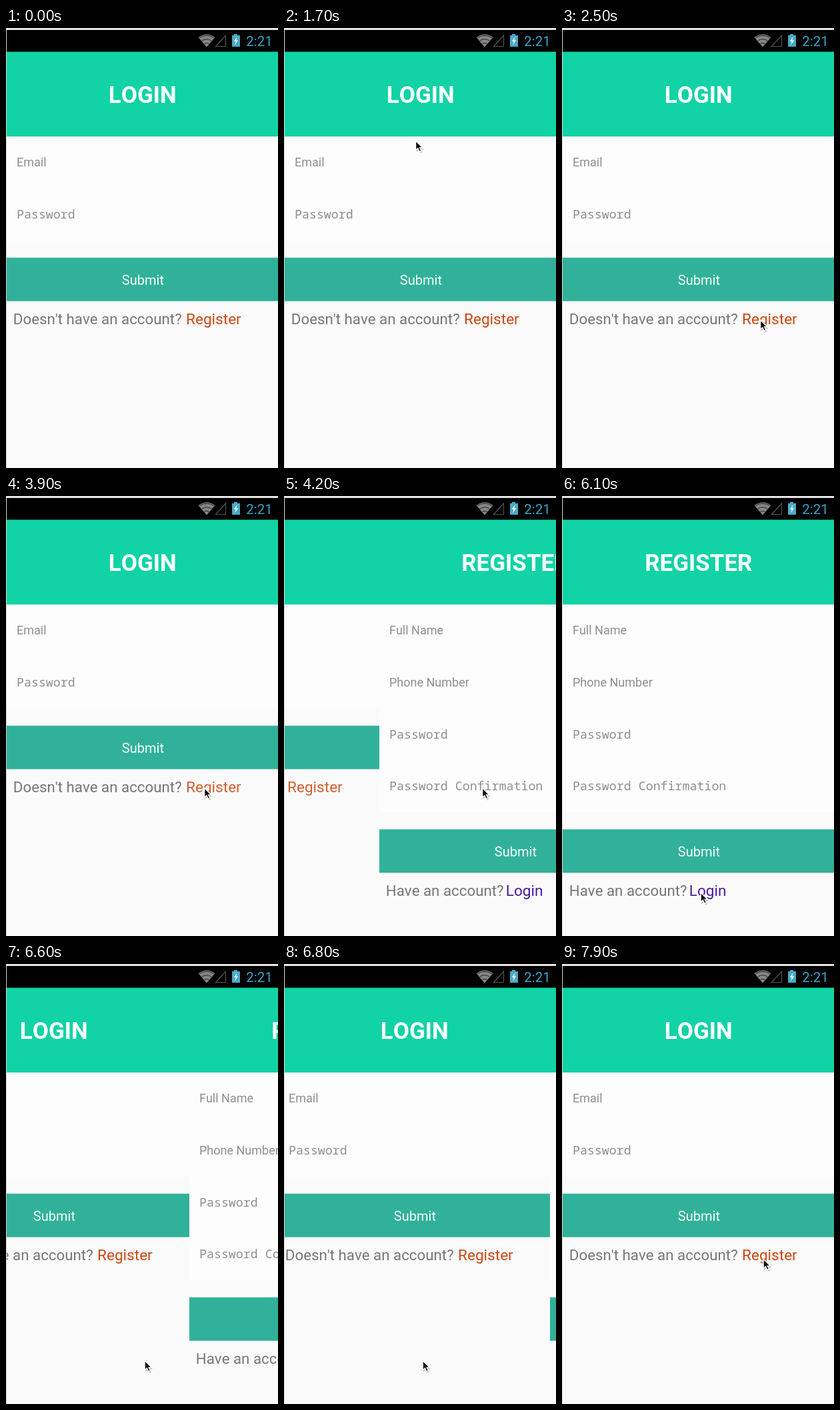
These frames come from a looping animation (408 px wide and 658 px high, 8000 ms). An HTML page:

```html
<!DOCTYPE html>
<html lang="en">
<head>
<meta charset="utf-8">
<title>Login and register</title>
<style>
  html, body { margin: 0; width: 100%; height: 100%; overflow: hidden; background: #fafafa; }
  svg { display: block; width: 408px; height: 658px; }
  text { font-family: Roboto, sans-serif; white-space: pre; font-kerning: none; }
  .title { font-size: 35px; font-weight: 700; fill: #fdfffe; text-anchor: middle; }
  .label { font-size: 18px; fill: #8e8e8e; }
  .mono { font-family: "Noto Sans Mono", monospace; font-size: 18.3px; }
  .submit { font-size: 20px; fill: #f6fffc; text-anchor: middle; }
  .ask { font-size: 22.3px; fill: #777; }
  .link { font-size: 22.6px; }
  .clock { font-size: 20.4px; fill: #35a5cb; }
</style>
</head>
<body>
<svg viewBox="0 0 408 658">
  <defs>
    <clipPath id="screen"><rect x="1" y="35" width="407" height="623"/></clipPath>
  </defs>
  <rect width="408" height="658" fill="#fafafa"/>
  <g clip-path="url(#screen)">
    <rect y="35" width="408" height="127.5" fill="#11d3a5"/>
    <g id="login"></g>
    <g id="register"></g>
  </g>
  <rect width="1" height="658" fill="#d6d6d6"/>
  <rect width="408" height="3" fill="#e2e2e2"/>
  <rect x="1" y="3" width="407" height="32.5" fill="#000"/>

  <path d="M288.5 14Q301 5 313.500 14L301 28.500Z" fill="#858585"/>
  <g id="waves" fill="none" stroke="#222" stroke-width="1"></g>
  <path d="M314.500 27.500H329.500V11Z" fill="none" stroke="#555" stroke-width="1.2"/>
  <path d="M342 9h5v2h4v17h-12V11h3Z" fill="#4aaac8"/>
  <path d="M346.500 13L341.800 20H344.600L343.300 25.500L348.200 18.300H345.300Z" fill="#f1fafc"/>
  <text class="clock" x="360.3" y="26.700">2:21</text>

  <g id="cursor">
    <path d="M1 2V17L4.500 14L7 18.500L10 17L8 13H12Z" fill="#000" opacity=".25"/>
    <path d="M0 0V14.500L3.300 11.500L5.800 16.500L8.600 15.200L6.300 10.400H10.600Z"
      fill="#111" stroke="#fff" stroke-width="1.5"/>
  </g>
</svg>
<script>
const LOOP = 8000, STEP = 100, WIDTH = 407, SLIDE = 600;
const TO_REGISTER = 4086, TO_LOGIN = 6480;
const $ = id => document.getElementById(id);
const text = (cls, x, y, str, attrs = '') =>
  `<text class="${cls}" x="${x}" y="${y}" ${attrs}>${str}</text>`;

for (let r = 4.5; r < 16; r += 4.5) {
  $('waves').innerHTML += `<path d="M${301 - r * 0.8} ${28 - r}q${r * 0.8} ${-r * 0.5} ${r * 1.6} 0"/>`;
}

function buildPage(id, { title, fields, ask, link, linkX, color }) {
  const end = 163 + fields.length * 77.6;
  const top = Math.round(end + 26);
  const labels = fields.map((name, i) => {
    const mono = name.startsWith('Password');
    return text(mono ? 'label mono' : 'label', 16, 207 + i * 77.8, name);
  });
  $(id).innerHTML = `
    <rect x="1" y="162.5" width="${WIDTH}" height="${end - 162.5}" fill="#fdfdfd"/>
    <rect x="1" y="${top - 0.5}" width="${WIDTH}" height="65" fill="#31b199"/>` +
    text('title', 204.8, 112.3, title) + labels.join('') +
    text('submit', 205.4, top + 40.3, 'Submit') +
    text('ask', 10.8, top + 99, ask) +
    text('link', linkX, top + 99, link, `fill="${color}"`);
}

buildPage('login', {
  title: 'LOGIN', fields: ['Email', 'Password'],
  ask: "Doesn't have an account?", link: 'Register', linkX: 270, color: '#cc4813'
});
buildPage('register', {
  title: 'REGISTER',
  fields: ['Full Name', 'Phone Number', 'Password', 'Password Confirmation'],
  ask: 'Have an account?', link: 'Login', linkX: 190.8, color: '#4a1d9e'
});

const clamp = k => Math.min(1, Math.max(0, k));
const smooth = k => k * k * (3 - 2 * k);
const decelerate = k => 1 - (1 - k) ** 5;

// The pointer rests at each place until the next move starts.
const ENTER = 1500;
const moves = [
  { start: ENTER, end: 1700, x: 197.5, y: 168.5 },
  { start: 1800, end: 2500, x: 297.5, y: 436.5 },
  { start: 5600, end: 6100, x: 208, y: 593 },
  { start: 7100, end: 7500, x: 302, y: 441 }
];

function pointerAt(t) {
  let x = 186, y = 8;
  for (const move of moves) {
    const k = smooth(clamp((t - move.start) / (move.end - move.start)));
    x += (move.x - x) * k;
    y += (move.y - y) * k;
  }
  return [x, y];
}

const slide = (t, start) => decelerate(clamp((t - start) / SLIDE));

function press(id, on) {
  document.querySelector(`#${id} .link`).style.opacity = on ? 0.87 : 1;
}

function draw(now) {
  const t = Math.floor((now % LOOP) / STEP) * STEP;
  const shift = Math.round(WIDTH * (slide(t, TO_REGISTER) - slide(t, TO_LOGIN)));
  $('login').setAttribute('transform', `translate(${-shift})`);
  $('register').setAttribute('transform', `translate(${WIDTH - shift})`);
  press('login', t >= 3900 && t < 4300);
  press('register', t >= 6400 && t < 6600);
  $('cursor').style.display = t < ENTER ? 'none' : '';
  $('cursor').setAttribute('transform', `translate(${pointerAt(t)})`);
}

const start = performance.now();
function tick() {
  draw(performance.now() - start);
  requestAnimationFrame(tick);
}
tick();
</script>
</body>
</html>
```
